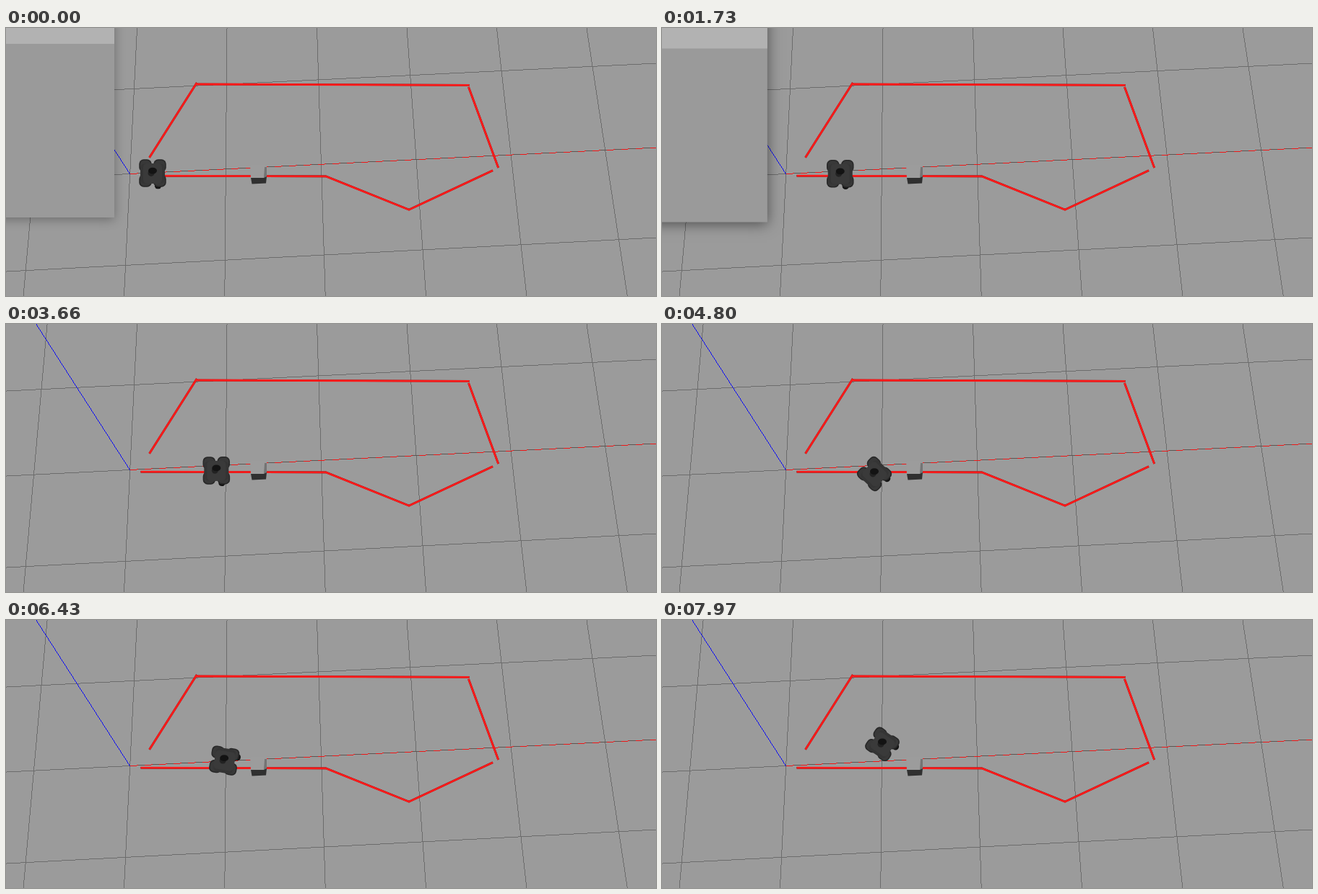
An HTML page with a canvas for the animation above (8000 ms loop, 900 px wide and 372 px high).

```html
<!DOCTYPE html>
<html lang="en">
<head>
<meta charset="utf-8">
<title>Robot on a course</title>
<style>
html, body { margin: 0; width: 100%; height: 100%; overflow: hidden; background: #9b9b9b; }
canvas { display: block; }
</style>
</head>
<body>
<canvas id="stage" width="900" height="372"></canvas>
<script>
const LOOP = 8000, TICK = 66.7;
const c = document.getElementById('stage').getContext('2d');

// Robot pose: time, x, y, left turn in degrees
const poses = [
  [0, 203, 201.5, 0], [2390, 263.3, 202.5, 0], [3660, 291.3, 203.3, 0],
  [4800, 294, 208, 46], [5350, 296, 209.5, 64], [6430, 302.3, 194.7, 81],
  [7040, 305.5, 180.5, 74], [7970, 305, 172, 55]
];

function poseAt(t) {
  let i = 1;
  while (i < poses.length - 1 && poses[i][0] < t) i++;
  const a = poses[i - 1], b = poses[i];
  const k = Math.min(1, (t - a[0]) / (b[0] - a[0]));
  return a.slice(1).map((v, j) => v + (b[j + 1] - v) * k);
}

// One-pixel line without smoothing; color may depend on x
function thin(x1, y1, x2, y2, color) {
  const n = Math.ceil(Math.max(Math.abs(x2 - x1), Math.abs(y2 - y1)));
  for (let i = 0; i <= n; i++) {
    const x = Math.floor(x1 + (x2 - x1) * i / n);
    const y = Math.floor(y1 + (y2 - y1) * i / n);
    c.fillStyle = typeof color === 'function' ? color(x) : color;
    c.fillRect(x, y, 1, 1);
  }
}

function trace(pts) {
  c.beginPath();
  for (let i = 0; i < pts.length; i += 2) c.lineTo(pts[i], pts[i + 1]);
}

function poly(color, ...pts) {
  trace(pts);
  c.fillStyle = color;
  c.fill();
}

// Raised strip: red top with a dark lower side
function strip(...pts) {
  trace(pts);
  c.save();
  c.translate(-0.2, 0.7);
  c.lineWidth = 2.6;
  c.strokeStyle = '#3a0c0c';
  c.stroke();
  c.restore();
  c.lineWidth = 2.8;
  c.strokeStyle = '#fb1a1a';
  c.stroke();
}

function oval(x, y, rx, ry, color) {
  c.fillStyle = color;
  c.beginPath();
  c.ellipse(x, y, rx, ry, 0, 0, Math.PI * 2);
  c.fill();
}

function pad(x, y, w, h, r, color) {
  c.fillStyle = color;
  c.beginPath();
  c.roundRect(x - w / 2, y - h / 2, w, h, r);
  c.fill();
}

function drawScene() {
  c.fillStyle = '#9b9b9b';
  c.fillRect(0, 0, 900, 372);
  const grid = '#6c6c6c';
  for (let i = 0; i < 7; i++) thin(57 + 124.5 * i, 0, 24 + 139.4 * i, 372, grid);
  for (const [left, right] of [[93, 49], [211, 166], [338, 291]])
    thin(0, left, 900, right, grid);
  thin(172, 202.4, 900, 166, x => (x - 172) % 20 < 11 ? '#ee1515' : '#5c5450');
  thin(42, 0, 171.5, 202, '#1010f0');

  strip(198.6, 179.8, 264.2, 76);
  strip(264, 78, 641.5, 79.3);
  strip(640.5, 82, 681.7, 194);
  strip(186.5, 205.2, 443, 205.9, 558, 252.2, 674, 197.8);

  // Obstacle box
  poly('#9c9c9c', 338, 190, 358, 190, 358, 208, 339, 208);
  poly('#747474', 358, 193, 361, 193, 361, 207, 357, 208);
  poly('#303030', 339, 208, 357, 208, 361, 206, 360, 215.5, 340.5, 216.5);
}

function drawRobot(x, y, turn) {
  c.save();
  c.translate(x, y);
  c.save();
  c.rotate(-turn * Math.PI / 180);
  oval(7.5, 17.8, 4.6, 4, '#141414');
  for (const sx of [-1, 1]) for (const sy of [-1, 1]) {
    pad(sx * 10, sy * 10.5, 17.5, 17.5, 6.5, '#282828');
    pad(sx * 10, sy * 10.5, 14.5, 14.5, 5.5, '#383838');
  }
  pad(0, 0.5, 34, 27, 6, '#343434');
  pad(0, 0.5, 26, 28, 5, '#3a3a3a');
  c.restore();
  // Upright sensor tower
  oval(-2, 0, 4.5, 4.4, '#222222');
  oval(0, -3.4, 6, 4.4, '#131313');
  c.restore();
}

// Floating window that is lifted, dragged away and closed
function drawPanel(t) {
  if (t > 2180) return;
  const k = Math.max(0, (t - 1600) / 520);
  const right = 150 - 16 * k, bottom = 263 + 25 * k;
  c.save();
  c.shadowColor = `rgba(0,0,0,${k ? 0.5 : 0.3})`;
  c.shadowBlur = k ? 18 : 14;
  c.shadowOffsetY = 3;
  c.fillStyle = '#9a9a9a';
  c.fillRect(-40, -40, right + 40, bottom + 40);
  c.restore();
  c.fillStyle = '#b2b2b2';
  c.fillRect(0, 0, right, bottom - 241);
}

function draw(t) {
  const live = t > 1930 && t < 2120 ? 1930 : t;
  const tick = Math.floor((live + 12) / TICK) * TICK;
  drawScene();
  drawRobot(...poseAt(tick));
  drawPanel(tick);
}

const start = performance.now();
function loop() {
  draw((performance.now() - start) % LOOP);
  requestAnimationFrame(loop);
}
loop();
</script>
</body>
</html>
```
